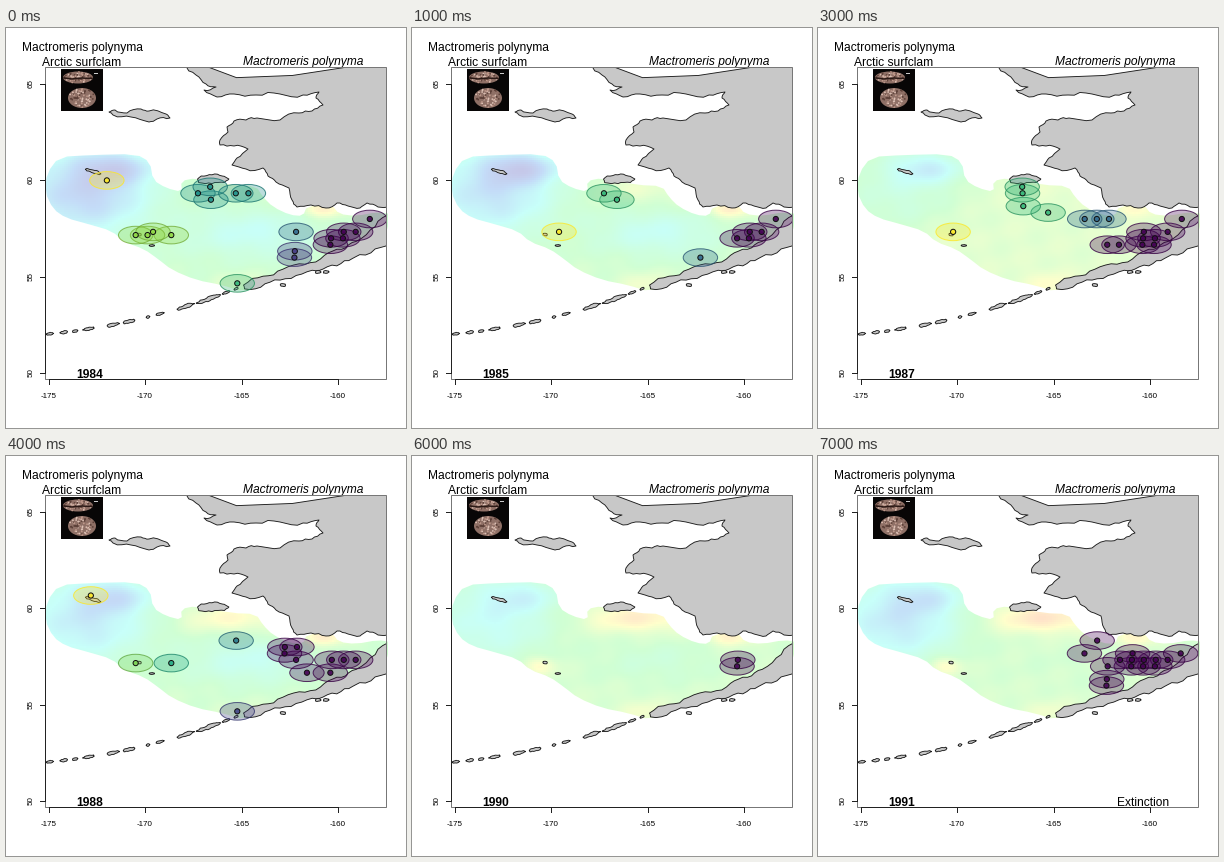
These frames come from a looping animation (400x400 px, 8000 ms). A matplotlib script:

```python
import numpy as np
import matplotlib.pyplot as plt
from matplotlib.animation import ArtistAnimation
from matplotlib.colors import LinearSegmentedColormap
from matplotlib.patches import Circle, Ellipse, Polygon, Rectangle

SIZE, DPI = 400, 100
PT = 72 / DPI
LEFT, RIGHT, TOP, BOTTOM = 38.5, 379.5, 38.5, 350.5
DEGREE = 19.3  # pixels per degree
LAND, INK = "#c8c8c8", "#222222"
OVAL_W, OVAL_H = 34.4, 17.6

plt.rcParams["font.family"] = "Liberation Sans"
rng = np.random.default_rng(4)
fig = plt.figure(figsize=(SIZE / DPI, SIZE / DPI), dpi=DPI, facecolor="white")
ax = fig.add_axes([0, 0, 1, 1])
ax.axis("off")
frame = Rectangle((LEFT, TOP), RIGHT - LEFT, BOTTOM - TOP, fill=False,
                  ec="#777777", lw=PT, zorder=6)
ax.add_patch(frame)


def text(x, y, s, px=12, **kw):
    kw.setdefault("ha", "center")
    return ax.text(x, y, s, fontsize=px * PT, **kw)


def add(patch):
    ax.add_patch(patch)
    patch.set_clip_path(frame)
    return patch


# ---- Land ----
def rough(points, rounds=2):
    """Displace the midpoint of every edge, again and again."""
    p = np.array(points, float)
    for _ in range(rounds):
        d = np.roll(p, -1, axis=0) - p
        push = rng.uniform(-0.13, 0.13, (len(p), 1)) * np.c_[-d[:, 1], d[:, 0]]
        p = np.stack([p, p + d / 2 + push], 1).reshape(-1, 2)
    return p


def smooth(points):
    p = np.array(points, float)
    q = np.roll(p, -1, axis=0)
    return np.stack([0.75 * p + 0.25 * q, 0.25 * p + 0.75 * q], 1).reshape(-1, 2)


def land(points):
    add(Polygon(rough(points), fc=LAND, ec="#1c1c1c", lw=0.9 * PT,
                joinstyle="round", zorder=3))


def island(x, y, w, h, slope=0.0):
    t = np.linspace(0, 2 * np.pi, 9)[:-1]
    r = rng.uniform(0.8, 1.1, t.size)
    dx = w / 2 * r * np.cos(t)
    land(np.c_[x + dx, y + h / 2 * r * np.sin(t) + slope * dx])


# Mainland
land([(178, 36), (190, 47), (200, 56), (210, 59), (198, 62), (211, 69),
      (228, 66), (250, 67), (274, 66), (297, 67), (313, 64), (310, 70),
      (317, 77), (306, 83), (293, 85), (274, 92), (251, 90), (240, 92),
      (228, 93), (221, 99), (222, 104), (214, 112), (214, 117), (228, 118),
      (242, 121), (231, 130), (226, 137), (240, 141), (257, 140), (262, 148),
      (270, 154), (283, 160), (286, 172), (291, 179), (305, 177), (320, 180),
      (331, 175), (342, 178), (354, 180), (361, 175), (372, 179), (395, 176),
      (395, 30), (178, 30)])

# Peninsula: a spine with a half width at each point
spine = np.array([(390, 197, 14), (372, 209, 11), (352, 220, 7), (337, 227, 6),
                  (320, 233, 6), (300, 240, 4), (278, 246, 5), (258, 252, 4),
                  (238, 259, 2)], float)
upper, lower = (spine[:, :2] + s * spine[:, 2:] * [0.25, 0.95] for s in (-1, 1))
land(np.vstack([upper, lower[::-1]]))

# Island arc trailing off to the west
for x, w in [(44, 8), (58, 8), (69, 6), (83, 12), (107, 13), (123, 14), (142, 4),
             (154, 8), (179, 18), (202, 23), (220, 8), (230, 4)]:
    d = x - 42
    island(x, 306 - 0.09 * d - 0.0008 * d * d, w, 2 + w / 8, -0.09 - 0.0016 * d)

land([(103, 84), (109, 82), (121, 85), (135, 81), (143, 83), (160, 86),
      (164, 90), (151, 91), (143, 94), (125, 89), (107, 87)])
island(206, 151, 36, 10)
island(87, 143.5, 17, 3.5, 0.3)
island(133, 206.5, 5, 3)
island(146, 217.5, 6, 2)
for x, y in [(277, 257), (312, 244), (320, 244)]:
    island(x, y, 6, 3)

# ---- Sea temperature ----
coast = smooth([
    (39, 164), (41, 145), (53, 129), (85, 127), (130, 126), (144, 134),
    (147, 152), (160, 160), (176, 164), (175, 153), (190, 150), (225, 157),
    (250, 158), (257, 169), (267, 179), (284, 187), (297, 188), (301, 178),
    (326, 177), (333, 186), (350, 188), (372, 184), (385, 186), (380, 206),
    (345, 223), (318, 234), (280, 246), (258, 254), (238, 264), (216, 257),
    (190, 252), (166, 242), (152, 231), (138, 221), (118, 214), (106, 203),
    (82, 196), (60, 190), (47, 181)])
shelf = Polygon(coast, transform=ax.transData)
PALETTE = LinearSegmentedColormap.from_list(
    "sea", ["#c6c6e8", "#c4dcf8", "#c8fffa", "#d0ffd4", "#ffffcc", "#ffdcc8"])
gx, gy = np.meshgrid(np.arange(39, 382, 2), np.arange(125, 266, 2))


def bump(x, y, rx, ry):
    return np.exp(-((gx - x) / rx) ** 2 - ((gy - y) / ry) ** 2)


# Order: west, northwest, cold pool, north, southwest, bay, south
BUMPS = np.array([
    bump(80, 165, 60, 40), bump(110, 140, 38, 16), bump(245, 205, 60, 22),
    bump(225, 162, 50, 14), bump(128, 210, 16, 9), bump(318, 181, 20, 8),
    bump(232, 256, 25, 12)])
ripple = 0.025 * np.sin(gx / 9 + gy / 14) * np.cos(gy / 8 - gx / 21)


def sea(heat):
    field = heat[0] + np.tensordot(heat[1:], BUMPS, 1) + ripple
    im = ax.imshow(PALETTE(np.clip(field, 0, 1)), extent=(38, 382, 266, 124),
                   aspect="auto", interpolation="nearest", zorder=1)
    im.set_clip_path(shelf)
    return im


# ---- Survey stations ----
def station(row, col):
    """A grid of 20 nautical miles that narrows with latitude."""
    step = DEGREE / 3 / np.cos(np.radians(58 - row / 3))
    return 242.4 + col * step, 191 + row * DEGREE / 3


def clusters(points):
    """Join points whose ovals touch; order the groups from the south-east."""
    groups = []
    for p in points:
        near = [g for g in groups if any(
            np.hypot((p[0] - q[0]) / OVAL_W, (p[1] - q[1]) / OVAL_H) < 1 for q in g)]
        groups = [g for g in groups if g not in near] + [sum(near, [p])]
    return sorted(groups, key=lambda g: -max(x + 0.1 * y for x, y in g))


def site(x, y, tone):
    color = plt.cm.viridis(tone)[:3]
    edge = color if tone > 0.85 else tuple(c * 0.8 for c in color)
    return [
        add(Ellipse((x, y), OVAL_W, OVAL_H, fc=color + (0.3,), ec=edge + (0.8,),
                    lw=PT, zorder=4)),
        add(Circle((x, y), 2.6, fc=color + (0.9,), ec="#101010", lw=PT, zorder=5)),
    ]


surveys = {}


def survey(year, heat, rows):
    cells = {(row, col) for row, cols in rows.items() for col in cols}
    surveys[year] = np.array(heat), cells


def between(year):
    """Fill a year from what its neighbours share."""
    (heat_a, a), (heat_b, b) = surveys[year - 1], surveys[year + 1]
    surveys[year] = (heat_a + heat_b) / 2, a & b


survey(1984, [.6, -.45, -.32, -.18, .08, 0, .3, .12], {
    -6: [-11], -5: [-3], -4: [-4, -1, 0], -3: [-3], 0: [10], 2: [-8, 4, 8, 9],
    2.5: [-9.5, -8.5, -6.5], 3: [7, 8], 4: [7], 5: [4], 6: [4], 10: [-1]})
survey(1986, [.64, -.3, -.45, -.2, .12, 0, .3, .12], {
    -4: [-4, -3], -3: [-4, -3], -2: [-2, -1], -1: [0, 2, 3], 0: [0, 2, 6, 8, 10],
    1: [6, 8], 2: [-8, 6, 8, 9], 3: [-8, 4, 5, 7, 8], 4: [5], 5: [3], 6: [4],
    7: [3]})
survey(1987, [.68, -.15, -.3, 0, .03, .05, .15, .12], {
    -5: [-3], -4: [-3], -2: [-3], -1: [-1], 0: [2, 3, 4, 10], 2: [-9, 7, 9],
    3: [7, 8], 4: [4, 5, 7, 8]})
survey(1988, [.62, -.33, -.25, -.18, .2, 0, .3, .05], {
    -8: [-12], -1: [-1], 0: [3, 4], 1: [3], 2: [4, 7, 8, 9], 2.5: [-9.5, -6.5],
    4: [5, 7], 10: [-1]})
survey(1989, [.64, -.1, -.18, -.14, .2, .2, .28, .12], {
    -3: [-3], -2: [-3], 0: [3], 2: [7], 3: [5, 7], 4: [7], 5: [3]})
survey(1991, [.64, -.36, -.2, -.02, .3, .22, .22, .1], {
    -1: [3], 1: [2, 6, 10], 2: [5, 6, 7, 8, 9], 3: [4, 6, 7, 8], 5: [4], 6: [4]})
between(1985)
between(1990)

scenes = []
for year, (heat, cells) in sorted(surveys.items()):
    artists = [sea(heat), text(84, 350, str(year), weight="bold", zorder=7)]
    groups = clusters([station(*c) for c in sorted(cells)])
    for k, group in enumerate(groups):
        for x, y in group:
            artists += site(x, y, k / max(len(groups) - 1, 1))
    if year == max(surveys):
        artists.append(text(325, 350, "Extinction", zorder=7))
    scenes.append(artists)

# ---- Axes and titles ----
line = dict(c=INK, lw=PT, zorder=7)
for k in range(4):
    x, y = 42.5 + 5 * DEGREE * k, 55.5 + 5 * DEGREE * k
    ax.plot([x, x], [BOTTOM, BOTTOM + 5], **line)
    ax.plot([LEFT - 5, LEFT], [y, y], **line)
    text(x, 369.5, str(5 * k - 175), 8)
    text(25, y, str(65 - 5 * k), 8, rotation=90, va="center")
ax.plot([42.5, 332], [BOTTOM, BOTTOM], **line)
ax.plot([LEFT, LEFT], [55.5, 345], **line)

text(76, 23, "Mactromeris polynyma")
text(76, 38, "Arctic surfclam")
text(297, 37, "Mactromeris polynyma", style="italic")

# ---- Shell picture ----
ax.add_patch(Rectangle((55, 41), 42, 42, fc="#080606", lw=0, zorder=7))
for x, y, w, h in [(72, 49.5, 30, 12), (76, 70, 28, 20)]:
    ax.add_patch(Ellipse((x, y), w, h, fc="#8f7066", lw=0, zorder=8))
    r, t = np.sqrt(rng.uniform(0, 0.85, 70)), rng.uniform(0, 2 * np.pi, 70)
    ax.scatter(x + w / 2 * r * np.cos(t), y + h / 2 * r * np.sin(t), s=1.6,
               c=rng.choice(["#dcc0b4", "#c09a8c", "#5c4038"], 70), lw=0, zorder=9)
ax.plot([58, 66, 76, 86], [50, 51, 50, 50.5], c="#2a1814", lw=1.6 * PT, zorder=10)
ax.plot([88, 91], [44.5, 44.5], c="#cccccc", lw=PT, zorder=9)

ax.set_xlim(0, SIZE)
ax.set_ylim(SIZE, 0)

anim = ArtistAnimation(fig, scenes, interval=1000, repeat=True, repeat_delay=0)
plt.show()
```
